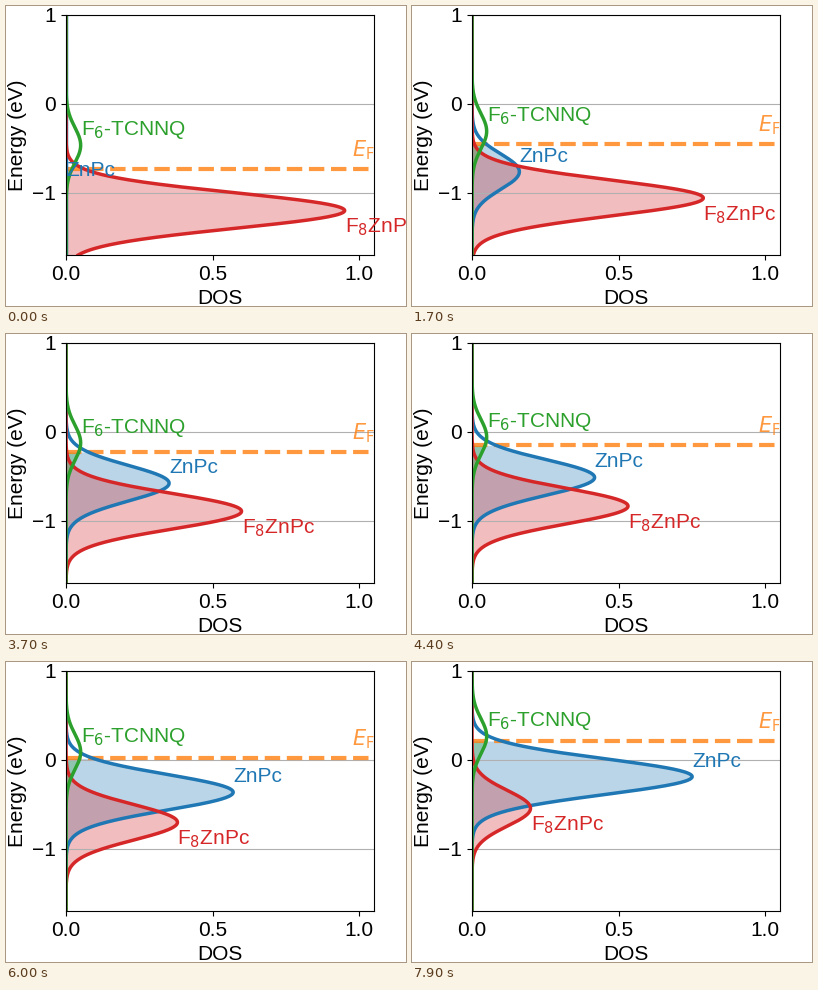
A matplotlib script for the animation above (8 s loop, 400 px wide and 300 px high).

```python
import numpy as np
import matplotlib.pyplot as plt
from matplotlib.animation import FuncAnimation

plt.rcParams.update({"font.family": "Liberation Sans", "font.size": 15})

FRAMES = 80
SIGMA = 0.2
DOPANT = 0.05
HOST = 1 - DOPANT
energy = np.linspace(-1.7, 1, 541)

fig, ax = plt.subplots(figsize=(4, 3), dpi=100)
fig.subplots_adjust(left=0.15, right=0.92, bottom=0.17, top=0.97)
ax.set(xlim=(0, 1.05), ylim=(-1.7, 1), xticks=[0, 0.5, 1], yticks=[-1, 0, 1],
       xlabel="DOS", ylabel="Energy (eV)")
ax.grid(axis="y")

fermi_line = ax.axhline(0, color="tab:orange", lw=3, ls="--", alpha=0.8)
fermi_label = ax.text(0.975, 0, r"$E_\mathrm{F}$", color="tab:orange", alpha=0.8)


def gauss(amp, center, e):
    return amp * np.exp(-(((e - center) / SIGMA) ** 2) / 2)


class Level:
    """Gaussian density of states, shaded up to the Fermi level."""

    def __init__(self, name, color, amp, center, label_dy):
        self.amp, self.center, self.label_dy = amp, center, label_dy
        self.fill = ax.fill_betweenx(energy, 0, 0 * energy, color=color, alpha=0.3, lw=0)
        self.line, = ax.plot([], [], color=color, lw=2.5)
        self.label = ax.text(0, 0, name, color=color)

    def update(self, x, fermi):
        amp, center = self.amp(x), self.center(x)
        self.line.set_data(gauss(amp, center, energy), energy)
        e = np.linspace(-1.7, fermi, 400)
        edge = np.column_stack([gauss(amp, center, e), e])
        self.fill.set_verts([np.vstack([[0, -1.7], edge, [0, fermi]])])
        self.label.set_position((amp, center + self.label_dy))


levels = [
    Level("ZnPc", "tab:blue", lambda x: HOST * x, lambda x: -0.92 + 0.926 * x, 0.113),
    Level("F$_8$ZnPc", "tab:red", lambda x: HOST * (1 - x), lambda x: -1.2 + 0.83 * x, -0.25),
    Level("F$_6$-TCNNQ", "tab:green", lambda x: DOPANT, lambda x: -0.465 + 0.925 * x, 0.11),
]


def fermi_level(x):
    return -0.585 + 1.014 * x - 0.051 * np.exp(-x / 0.3) - 0.096 * np.exp(-x / 0.08)


def update(i):
    x = i / 100  # mixing ratio
    fermi = fermi_level(x)
    fermi_line.set_ydata([fermi, fermi])
    fermi_label.set_y(fermi + 0.145)
    for level in levels:
        level.update(x, fermi)
    return []


anim = FuncAnimation(fig, update, frames=FRAMES, interval=100, repeat=True, repeat_delay=0)
plt.show()
```
